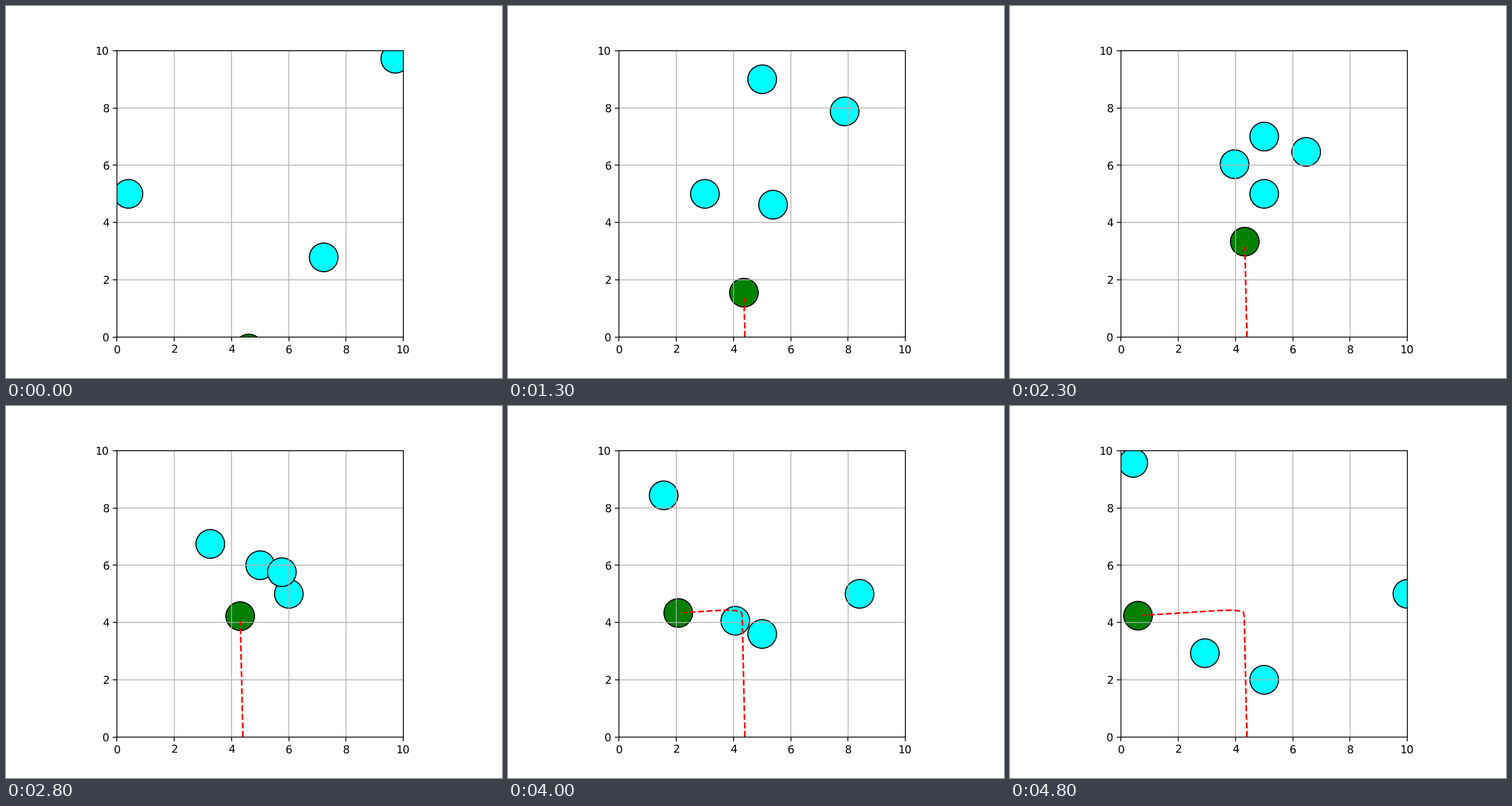
Animation, 864 px wide and 648 px high, one loop 4.9 s. Source, as a matplotlib script:

```python
import matplotlib.pyplot as plt
import numpy as np
from matplotlib.animation import FuncAnimation

FRAMES, INTERVAL = 49, 100
STEP = 0.2
RADIUS = 0.5
TURN, BRAKE = 29, 40  # steps where the robot turns left and starts to slow

# Obstacles: start point and heading, all at the same speed.
DIAG = np.sqrt(0.5)
OBSTACLES = [
    ((0, 5), (1, 0)),
    ((5, 12), (0, -1)),
    ((10, 10), (-DIAG, -DIAG)),
    ((7.5, 2.5), (-DIAG, DIAG)),
]


def robot_path():
    """Climb after a damped swing, then bend left and brake."""
    n = np.arange(FRAMES)
    up_x = 4.414 - 0.004 * n + 0.186 * 0.55**n * np.cos(n)
    up_y = -0.763 + 0.178 * n + 0.363 * 0.45**n

    k = np.maximum(n - TURN, 0)
    left_x = 4.27 - STEP * k + 0.000246 * np.maximum(n - BRAKE, 0)**3
    left_y = 4.2 + 0.064 * left_x - 0.11 * 0.4**k

    climbing = n < TURN
    return np.where(climbing, up_x, left_x), np.where(climbing, up_y, left_y)


def add_disc(color):
    disc = plt.Circle((0, 0), RADIUS, facecolor=color, edgecolor="black")
    return ax.add_patch(disc)


# Lines and glyphs keep their subpixel positions.
plt.rcParams.update({"path.snap": False, "text.hinting": "none"})

fig, ax = plt.subplots(figsize=(6.4, 4.8), dpi=135)
ticks = range(0, 11, 2)
ax.set_aspect("equal")
ax.set(xlim=(0, 10), ylim=(0, 10), xticks=ticks, yticks=ticks)
ax.grid(True)

px, py = robot_path()
robot = add_disc("green")
discs = [add_disc("cyan") for _ in OBSTACLES]
trail, = ax.plot([], [], "r--", linewidth=1.5)


def update(n):
    robot.center = px[n], py[n]
    trail.set_data(px[:n], py[:n])
    for disc, (start, heading) in zip(discs, OBSTACLES):
        disc.center = tuple(np.add(start, np.multiply(heading, STEP * (n + 2))))
    return [robot, *discs, trail]


anim = FuncAnimation(fig, update, frames=FRAMES, interval=INTERVAL,
                     repeat=True, repeat_delay=0, blit=False)
plt.show()
```
